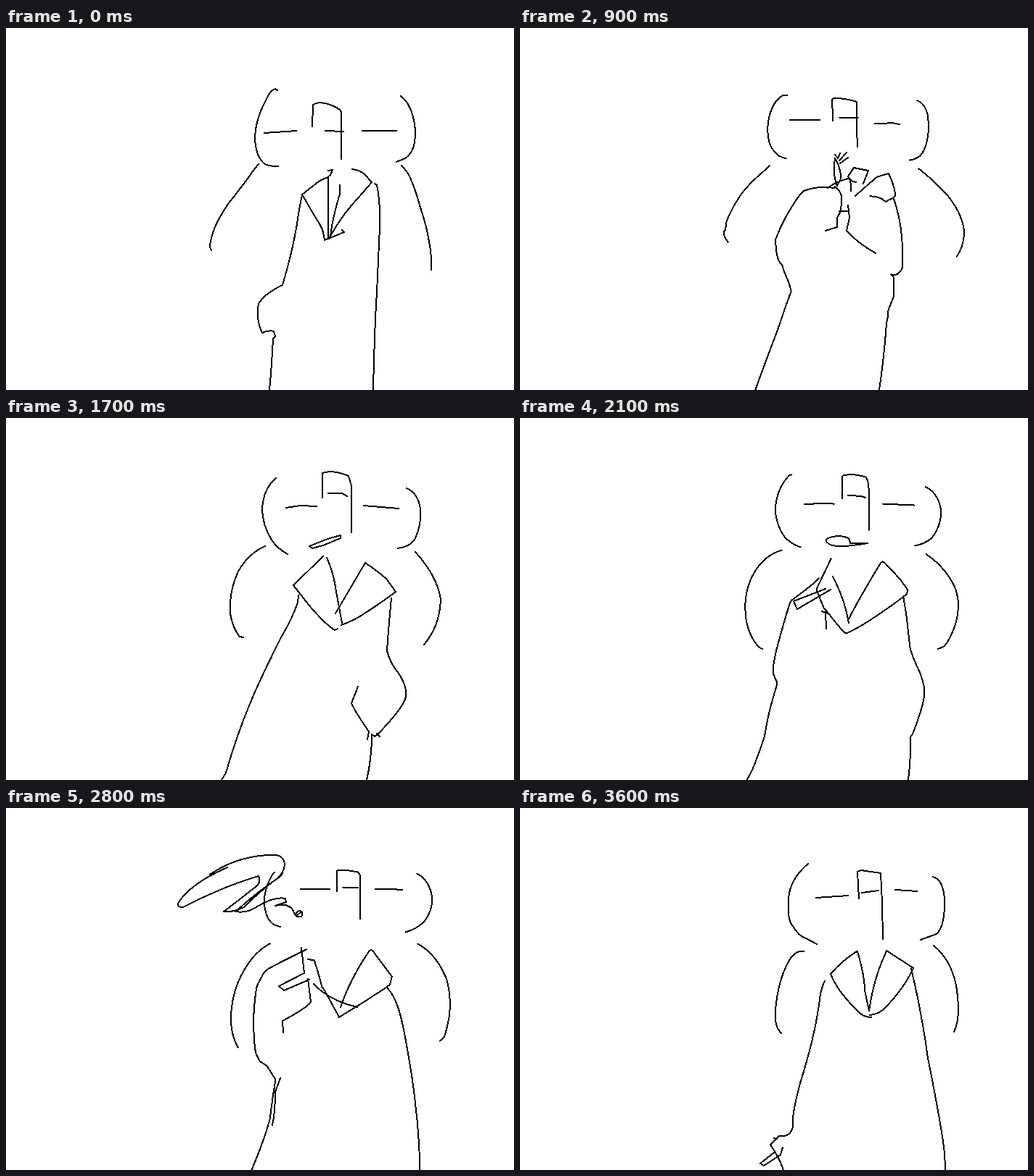
An HTML page for the animation above (3700 ms loop, 700 by 500 pixels).

```html
<!DOCTYPE html>
<html lang="en">
<head>
<meta charset="utf-8">
<title>Line figure</title>
<style>
html, body { margin: 0; width: 100%; height: 100%; overflow: hidden; background: #fff; }
svg { display: block; }
path { fill: none; stroke: #000; stroke-width: 2; stroke-linejoin: round; stroke-linecap: round; }
</style>
</head>
<body>
<svg width="700" height="500" viewBox="0 0 700 500" shape-rendering="crispEdges"></svg>
<script>
const STEP = 100, LOOP = 3700, SAMPLES = 60;
const times = [0, 500, 1200, 1700, 2500, 3100, 3600];

// One stroke per part; each entry is its shape at the matching time.
const parts = {
  headLeft: [
    'M374 86L371 84Q364 86 358 100Q343 128 343 154Q345 180 357 188Q362 191 375 191',
    'M369 95Q360 97 352 110Q344 127 343 148Q344 172 353 183L359 190L371 192',
    'M368 92L363 89Q350 94 343 113Q338 130 341 147Q344 162 364 172',
    'M372 83Q355 97 353 125Q353 148 367 170Q375 181 388 188',
    'M377 74L374 72Q352 95 350 125Q352 146 362 158Q372 167 386 169',
    'M364 105Q358 140 365 157L371 159',
    'M397 77Q372 98 370 125Q368 153 375 162Q385 178 394 180L409 188'
  ],
  headRight: [
    'M544 94Q554 101 560 119Q566 140 563 158Q560 174 550 180L538 185',
    'M548 102Q558 108 561 122Q563 140 560 155Q556 175 546 181L533 186',
    'M547 99Q557 101 562 117Q566 140 561 158Q556 180 540 180',
    'M552 97Q567 103 571 125Q573 148 563 168Q556 178 540 180',
    'M565 93Q585 103 589 127Q588 146 576 159Q566 168 548 173',
    'M567 88Q584 97 586 125Q584 160 553 170',
    'M569 95Q583 99 585 125Q586 163 574 174L552 182'
  ],
  eyeLeft: [
    'M356 145L371 144L400 142', 'M370 134L406 136', 'M373 122L419 120',
    'M386 124L405 121L428 122', 'M397 115H438', 'M414 109H454', 'M408 124L452 121'
  ],
  eyeRight: [
    'M491 142H538', 'M496 138H523L536 140', 'M484 128L505 126L514 128',
    'M493 121L541 125', 'M506 116H546', 'M512 108L526 107L547 110', 'M517 113L547 115'
  ],
  nose: [
    'M422 136L423 106Q428 102 440 104Q452 107 460 113L462 116V181',
    'M430 136V103H436Q448 103 460 111V173',
    'M432 122L430 92L467 95L468 158',
    'M436 110V76Q450 71 472 80L476 94V158',
    'M452 112L451 84Q467 80 483 84L485 91V152',
    'M460 118V88L491 94V154',
    'M467 125L465 88L470 86L497 90L499 130L500 181'
  ],
  bridge: [
    'M440 142L465 143', 'M438 134H460', 'M442 116H470',
    'M444 104H463L470 108', 'M459 110L482 112', 'M468 109L488 108', 'M471 117L494 114'
  ],
  hairLeft: [
    'M348 188Q341 196 333 208Q318 228 306 243Q290 267 285 283Q281 296 281 303L283 307',
    'M354 193L347 204Q326 226 317 242Q305 269 303 290L307 302L304 298L309 317',
    'M336 188Q309 204 287 230Q263 258 263 274L270 280',
    'M357 177Q334 187 320 212Q307 240 309 270Q312 290 322 302L327 303',
    'M365 188Q340 192 325 216Q310 240 311 267Q314 313 341 335',
    'M362 187Q330 228 308 276Q297 300 298 326',
    'M391 198Q382 196 373 207Q357 233 353 270Q348 300 360 311'
  ],
  hairRight: [
    'M545 190Q553 198 557 207Q566 228 570 245Q580 275 582 290Q587 312 586 334',
    'M550 191Q563 205 572 222Q591 252 594 274Q598 302 588 339',
    'M549 197Q580 214 595 225Q622 250 625 268Q625 288 612 298',
    'M564 185Q594 218 599 250Q598 287 576 313',
    'M555 191Q590 206 606 240Q614 275 601 302Q591 325 586 325H576',
    'M579 184Q597 195 608 232Q619 270 619 319',
    'M570 190Q594 210 601 245Q608 290 598 309'
  ],
  collarLeft: [
    'M444 197L450 196L447 203L442 207Q435 208 422 219L408 230L426 261Q435 274 437 282L439 293L466 282L463 279',
    'M447 215L445 198Q425 208 411 223',
    'M463 233V213Q445 213 434 219',
    'M437 191L396 231L417 258Q440 285 453 293L457 291',
    'M420 198L421 268L424 270L445 304',
    'M411 220L429 191Q445 214 471 270',
    'M464 198Q445 210 428 229Q437 253 466 281Q473 289 484 289'
  ],
  collarRight: [
    'M477 195Q487 196 494 202L504 213L485 235Q463 258 445 291',
    'M475 215L495 197Q502 218 505 239L483 253',
    'M452 245L472 227L514 192Q526 212 527 230L510 236L508 239Q501 221 481 217',
    'M454 270L495 200Q510 210 524 222L537 240Q520 253 500 266Q480 280 462 286',
    'M453 283Q465 255 503 194L536 241Q495 274 442 307',
    'M469 268Q476 228 503 194L537 236L474 272',
    'M481 280Q488 233 504 200L505 197L542 221Q529 250 502 277Q494 285 482 286'
  ],
  bodyLeft: [
    'M408 231Q404 248 401 271Q394 312 381 355Q356 367 348 381Q344 402 353 421Q362 417 369 419L371 426L368 429Q366 470 363 500',
    'M432 224Q410 236 402 249L372 299L363 317L371 323L376 331L394 338L388 336Q380 375 366 427Q355 465 350 500',
    'M434 219Q410 204 382 204Q360 229 347 264Q338 290 334 314Q345 332 360 345L369 358L357 384Q345 420 305 500',
    'M403 245L402 255Q395 276 379 303Q348 365 336 395Q318 438 303 490L297 500',
    'M420 198L359 216Q352 262 348 295Q346 325 351 334Q358 341 370 346Q358 395 358 430Q350 460 328 500',
    'M407 193Q370 219 336 250Q331 280 334 302Q339 345 339 359Q343 364 380 372Q372 420 366 442L349 500',
    'M420 239Q414 250 412 272Q405 320 386 380Q374 425 376 440Q373 455 357 453L345 465Q357 482 363 500'
  ],
  bodyRight: [
    'M508 215L511 217Q516 240 515 275Q513 320 511 365Q508 410 506 500',
    'M503 244Q512 270 515 295Q521 345 524 391L505 403L503 413L499 418Q499 460 495 500',
    'M524 230Q535 262 535 300L533 335L521 340L508 334L502 323L509 326V405Q504 447 495 500',
    'M531 249Q527 290 525 322Q530 340 542 354Q553 372 551 385Q548 400 512 437L508 440L504 437Q504 470 497 500',
    'M526 248Q546 287 560 355Q574 410 573 500',
    'M526 250Q543 262 547 300Q553 350 559 410Q565 455 568 500',
    'M539 222Q553 280 562 345Q575 410 583 460Q586 480 586 500'
  ]
};

// Details that appear and vanish with the nearest pose.
const hands = [
  'M444 207V291M460 217V229Q450 262 447 288',
  'M431 223Q452 212 473 211L481 231L480 245Q457 256 451 268Q444 300 432 317Q420 325 407 330',
  'M434 219Q445 227 443 240L442 253L437 262V275L421 280M452 245L454 262L450 280Q465 297 490 311M440 253H453',
  'M442 193Q452 215 455 240L463 283M485 371L476 394Q480 404 500 433L498 444M511 436L515 440',
  'M416 267L424 270M421 268L422 291M431 219Q448 252 453 283',
  'M407 193L411 228L376 246L383 252L418 237M416 236L420 268Q415 276 381 294L382 310M378 373L371 392Q371 420 367 438M424 243Q445 266 484 275',
  'M465 198Q475 232 475 252L481 280'
];
const props = [
  '',
  'M458 297V278Q462 274 472 273H488L490 298M452 299L499 297L501 299M473 245L478 241L484 272M475 246L482 272M484 264L489 266',
  'M437 218Q430 200 434 180Q442 192 442 208ZM434 175L438 180L441 173M440 183L450 172M441 187L452 179M463 213Q455 212 452 205L460 193L480 197L473 215',
  'M461 162L443 167L418 177L422 180L437 176L461 166Z',
  'M421 236L377 253L382 264L428 237M455 172L453 166Q440 160 424 166Q418 171 430 176Q445 179 479 173H455',
  'M305 82Q255 104 238 130Q234 137 244 137Q300 108 348 94Q353 104 340 112Q320 128 300 143Q310 145 328 137Q350 115 365 104M281 92Q315 68 360 65Q383 62 384 78Q383 90 373 98M381 90Q378 96 370 100Q335 125 317 143Q332 146 348 135Q370 122 385 125L386 130L371 135Q392 130 397 145Q400 152 407 150Q411 143 404 142Q396 146 401 148L406 144',
  'M362 469L359 479L336 494L331 491L350 476M354 457L350 456'
];

const svg = document.querySelector('svg');
const newPath = () => document.createElementNS('http://www.w3.org/2000/svg', 'path');
const addPath = () => svg.appendChild(newPath());

function sample(d) {
  const path = newPath();
  path.setAttribute('d', d);
  const length = path.getTotalLength();
  return Array.from({ length: SAMPLES + 1 }, (_, i) => path.getPointAtLength(length * i / SAMPLES));
}

const strokes = Object.values(parts).map(shapes => ({
  shapes, points: shapes.map(sample), el: addPath()
}));
const details = [hands, props].map(shapes => ({ shapes, el: addPath() }));

const mix = (a, b, k) => (a + (b - a) * k).toFixed(1);
const blend = (from, to, k) =>
  'M' + from.map((p, i) => mix(p.x, to[i].x, k) + ' ' + mix(p.y, to[i].y, k)).join('L');

let shown = -1;
function draw() {
  const t = Math.floor(performance.now() % LOOP / STEP) * STEP;
  if (t !== shown) {
    shown = t;
    const pose = times.findLastIndex(start => start <= t);
    const next = Math.min(pose + 1, times.length - 1);
    const k = next > pose ? (t - times[pose]) / (times[next] - times[pose]) : 0;
    for (const { shapes, points, el } of strokes)
      el.setAttribute('d', k ? blend(points[pose], points[next], k) : shapes[pose]);
    for (const { shapes, el } of details)
      el.setAttribute('d', shapes[k < 0.5 ? pose : next]);
  }
  requestAnimationFrame(draw);
}
draw();
</script>
</body>
</html>
```
